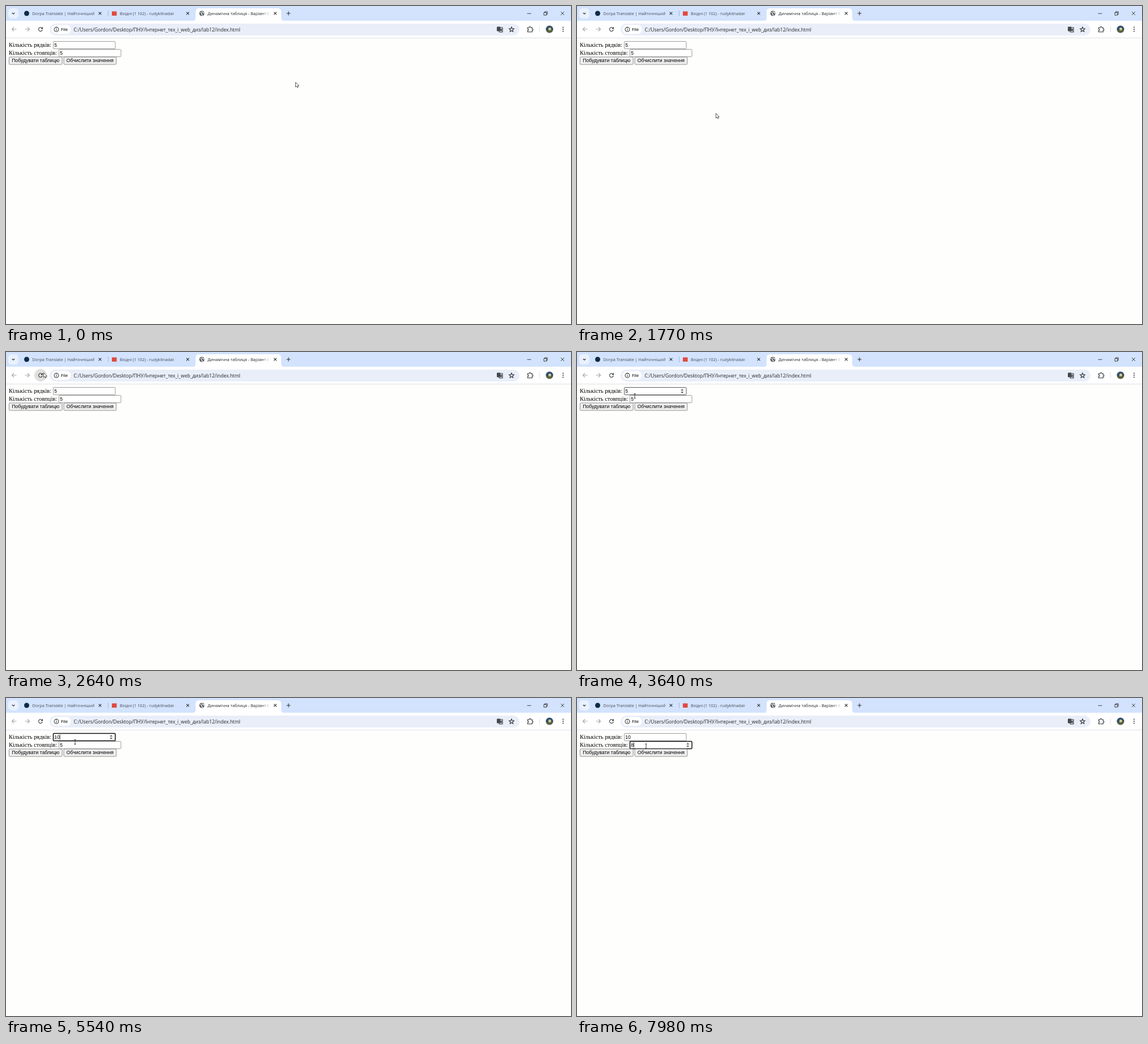
Write an HTML page that moves like this. It is 998x561 px and loops after 8000 ms.

```html
<!DOCTYPE html>
<html lang="uk">
<head>
<meta charset="utf-8">
<title>Динамічна таблиця</title>
<style>
  html, body { margin: 0; width: 100%; height: 100%; overflow: hidden; background: #fefefc; }
  svg { display: block; width: 100%; height: 100%; }
  text { white-space: pre; }
  .ui { font: 7.3px "Open Sans", "Noto Sans", sans-serif; fill: #474b52; }
  .url { font-size: 8.52px; fill: #24272b; }
  .label { font: 10.4px "Liberation Serif", serif; }
  .form { font: 8.67px "Liberation Sans", sans-serif; }
  .icon { fill: none; stroke: #303235; stroke-width: 1.1; }
  .box { fill: #fff; stroke: #858585; stroke-width: .8; }
  .box.hover { stroke: #333; }
  .box.focus { stroke: #101010; stroke-width: 1.5; }
  .button { fill: #efefef; stroke: #767676; stroke-width: .8; }
</style>
</head>
<body>
<svg viewBox="0 0 998 561">
  <defs>
    <linearGradient id="fadeBlue"><stop stop-color="#d3e3fd" stop-opacity="0"/><stop offset="1" stop-color="#d3e3fd"/></linearGradient>
    <linearGradient id="fadeWhite"><stop stop-color="#fff" stop-opacity="0"/><stop offset="1" stop-color="#fff"/></linearGradient>
    <path id="cross" d="M-2.4-2.4 2.4 2.4M2.4-2.4-2.4 2.4"/>
    <path id="spinner" d="M-2.5-.9 0-3.7 2.5-.9zM-2.5 .9 0 3.7 2.5 .9z" fill="#555"/>
    <clipPath id="clip1"><path d="M46 0h110v26H46z"/></clipPath>
    <clipPath id="clip2"><path d="M200 0h110v26H200z"/></clipPath>
    <clipPath id="clip3"><path d="M355 0h111v26H355z"/></clipPath>
  </defs>

  <!-- Tab strip -->
  <path fill="#d3e3fd" d="M0 0h998v27H0z"/>
  <rect x="4" y="4" width="18" height="18" rx="6" fill="#e9f1fe"/>
  <path class="icon" d="M10.8 12 13 14.2 15.2 12"/>
  <path fill="#fff" d="M329 26.5q6 0 6-6V10q0-6 6-6H480q6 0 6 6v10.500q0 6 6 6zM0 26h998v30.500H0z"/>
  <circle cx="36.500" cy="13" r="4.500" fill="#0f2b46"/>
  <rect x="187" y="9.500" width="8.500" height="7.500" fill="#e04a3f"/>
  <circle cx="346" cy="13" r="4.600" fill="#5f6368"/>
  <path d="M342.500 11.500q3 0 3 2t2 3M346 9.200q0 2 2 2.200t1.700 2" fill="none" stroke="#fff" stroke-width="1.200"/>
  <g class="ui">
    <text x="46.500" y="16" clip-path="url(#clip1)">Dorpa Translate | Найточніший</text>
    <text x="201" y="16" clip-path="url(#clip2)">Вхідні (1 102) - rudykitnadakhom</text>
    <text x="356" y="16" fill="#24272b" clip-path="url(#clip3)">Динамічна таблиця - Варіант 8</text>
  </g>
  <path fill="url(#fadeBlue)" d="M142 6h14v15h-14zM296 6h14v15h-14z"/>
  <path fill="url(#fadeBlue)" d="M296 6h14v15h-14z"/>
  <path fill="url(#fadeWhite)" d="M453 6h13v15h-13z"/>
  <path stroke="#a3b8d9" d="M180.500 8v10"/>
  <g class="icon">
    <use href="#cross" x="166" y="13"/><use href="#cross" x="321" y="13"/><use href="#cross" x="475.500" y="13"/>
    <path d="M495.500 13h7M499 9.500v7"/>
    <path stroke-width=".9" d="M920.500 13.300h7M950 11.500h4.700v4.700H950zM951.500 11.500v-1.500h4.700v4.700h-1.500M980 10l6 6M986 10l-6 6"/>
  </g>

  <!-- Toolbar -->
  <path stroke="#dce1e8" d="M0 56.500h998"/>
  <circle id="reloadHover" cx="61" cy="41" r="11" fill="#e0e1dd"/>
  <g class="icon">
    <path stroke="#a4a6a8" d="M18.500 41h-8M14 37.500 10.500 41l3.500 3.500M33.500 41h8M38 37.500 41.500 41 38 44.500"/>
    <path d="M63.800 39.200A3.400 3.400 0 1 0 64.300 42M64.500 37.300v2.600h-2.600"/>
  </g>
  <rect x="77" y="31" width="830" height="21" rx="10.500" fill="#e9eef9"/>
  <rect x="80.500" y="33.500" width="34" height="15.500" rx="7.700" fill="#fff"/>
  <g class="icon" stroke-width="1">
    <circle cx="89" cy="41.300" r="3.900"/><path d="M89 40.700v2.700M89 39v.9"/>
  </g>
  <text class="ui" x="97" y="44" style="font-weight:600;fill:#24272b">File</text>
  <text class="ui url" x="119.500" y="44.500">C:/Users/Gordon/Desktop/ПНУ/Інтернет_тех_і_web_диз/lab12/index.html</text>
  <rect x="867" y="36.500" width="6.500" height="8" rx="1" fill="#44474b"/>
  <path class="icon" stroke-width=".8" d="M873.500 38h3.500v8h-5.500l-1-1.500M873.500 41h2.700M875 40v1q0 2-1.500 3M873.500 42l2.500 2.200"/>
  <g class="icon">
    <path d="M893 37 894.200 39.900 897.300 40.100 894.900 42.100 895.700 45.200 893 43.500 890.300 45.200 891.100 42.100 888.700 40.100 891.800 39.900z"/>
    <path d="M921.500 38h2.800q0-1.700 1.300-1.700t1.300 1.700h2.400v2.500q1.700 0 1.700 1.300t-1.700 1.300V45.700h-7.800v-2.600q1.600 0 1.600-1.300t-1.600-1.300z"/>
  </g>
  <path stroke="#d5e0f2" d="M942.500 36v10"/>
  <circle cx="960" cy="41" r="6.500" fill="#31506e"/>
  <path d="M953.800 42.500h12.400a6.500 6.500 0 0 1-12.400 0z" fill="#59643d"/>
  <circle cx="960.500" cy="40.500" r="2.500" fill="#d9c98a"/>
  <g fill="#303235"><circle cx="984" cy="37.500" r="1"/><circle cx="984" cy="41" r="1"/><circle cx="984" cy="44.500" r="1"/></g>

  <!-- Page -->
  <g class="label">
    <text x="5" y="71.700">Кількість рядків:</text>
    <text x="5" y="85.700">Кількість стовпців:</text>
  </g>
  <g class="form">
    <g id="rows">
      <rect class="box" x="83.500" y="62.500" width="109.500" height="13" rx="1.300"/>
      <text x="85.300" y="71.500"></text>
      <use href="#spinner" x="185.700" y="69"/>
      <path class="caret" stroke="#000" stroke-width=".8" d="M0 64.500v9"/>
    </g>
    <g id="columns">
      <rect class="box" x="93.500" y="76.500" width="109.500" height="13" rx="1.300"/>
      <text x="95.300" y="85.500"></text>
      <use href="#spinner" x="195.700" y="83"/>
      <path class="caret" stroke="#000" stroke-width=".8" d="M0 78.500v9"/>
    </g>
    <g text-anchor="middle">
      <rect class="button" x="5.400" y="89.900" width="93.800" height="13.200" rx="1.500"/>
      <text x="52.300" y="99.300">Побудувати таблицю</text>
      <rect class="button" x="102" y="89.900" width="92.800" height="13.200" rx="1.500"/>
      <text x="148.400" y="99.300">Обчислити значення</text>
    </g>
  </g>

  <g id="pointer">
    <path id="arrow" fill="#fff" stroke="#333" stroke-width=".8" d="M.5.500v8.500l2-1.800 1.300 2.800 1.400-.7L4 6.700h2.500z"/>
    <path id="beam" fill="none" stroke="#333" stroke-width=".9" d="M-1.700-4H1.700M0-4V4M-1.700 4H1.700"/>
  </g>
</svg>
<script>
  const LOOP = 8000;
  const byId = id => document.getElementById(id);
  const show = (el, on) => el.setAttribute("visibility", on ? "visible" : "hidden");
  const within = (t, from, to) => t >= from && t < to;

  // Pointer path: time, x, y
  const path = [
    [0, 511, 134], [150, 511, 134], [800, 430, 286], [1000, 395, 299],
    [1770, 245, 189], [2300, 120, 92], [2640, 66, 36], [2850, 63, 37],
    [3330, 88, 130], [3640, 102, 77.5], [3900, 122, 77.5], [5950, 122, 77.5],
    [6300, 122, 90], [6600, 122, 85], [LOOP, 122, 85]
  ];

  // Each edit is [time, value]; the caret blink restarts at every edit.
  const fields = [
    { id: "rows", hover: [3560, 5950], focus: [3950, 6680],
      edits: [[0, "5"], [3950, "5"], [4900, ""], [5150, "1"], [5350, "10"]] },
    { id: "columns", hover: [6100, LOOP], focus: [6680, LOOP],
      edits: [[0, "5"], [6680, "5"], [7200, ""], [7500, "8"]] }
  ];
  for (const field of fields) {
    const group = byId(field.id);
    field.box = group.querySelector(".box");
    field.text = group.querySelector("text");
    field.spinner = group.querySelector("use");
    field.caret = group.querySelector(".caret");
  }

  function pointerAt(t) {
    const i = path.findIndex(point => point[0] > t);
    const [t0, x0, y0] = path[i - 1], [t1, x1, y1] = path[i];
    const k = (t - t0) / (t1 - t0);
    return [x0 + (x1 - x0) * k, y0 + (y1 - y0) * k];
  }

  function drawField(field, t) {
    const [editTime, value] = field.edits.filter(edit => edit[0] <= t).pop();
    const focused = within(t, ...field.focus), hovered = within(t, ...field.hover);
    field.text.textContent = value;
    field.box.setAttribute("class", "box" + (focused ? " focus" : hovered ? " hover" : ""));
    show(field.spinner, focused || hovered);
    show(field.caret, focused && (t - editTime) % 1000 < 500);
    const textWidth = value ? field.text.getComputedTextLength() : 0;
    field.caret.setAttribute("transform", `translate(${+field.text.getAttribute("x") + textWidth + .3})`);
  }

  function draw(now) {
    const t = now % LOOP;
    const [x, y] = pointerAt(t);
    const overText = t >= 3560;
    byId("pointer").setAttribute("transform", `translate(${x} ${y})`);
    show(byId("arrow"), !overText);
    show(byId("beam"), overText);
    show(byId("reloadHover"), within(t, 2560, 2960));
    fields.forEach(field => drawField(field, t));
    requestAnimationFrame(draw);
  }
  draw(performance.now());
</script>
</body>
</html>
```
